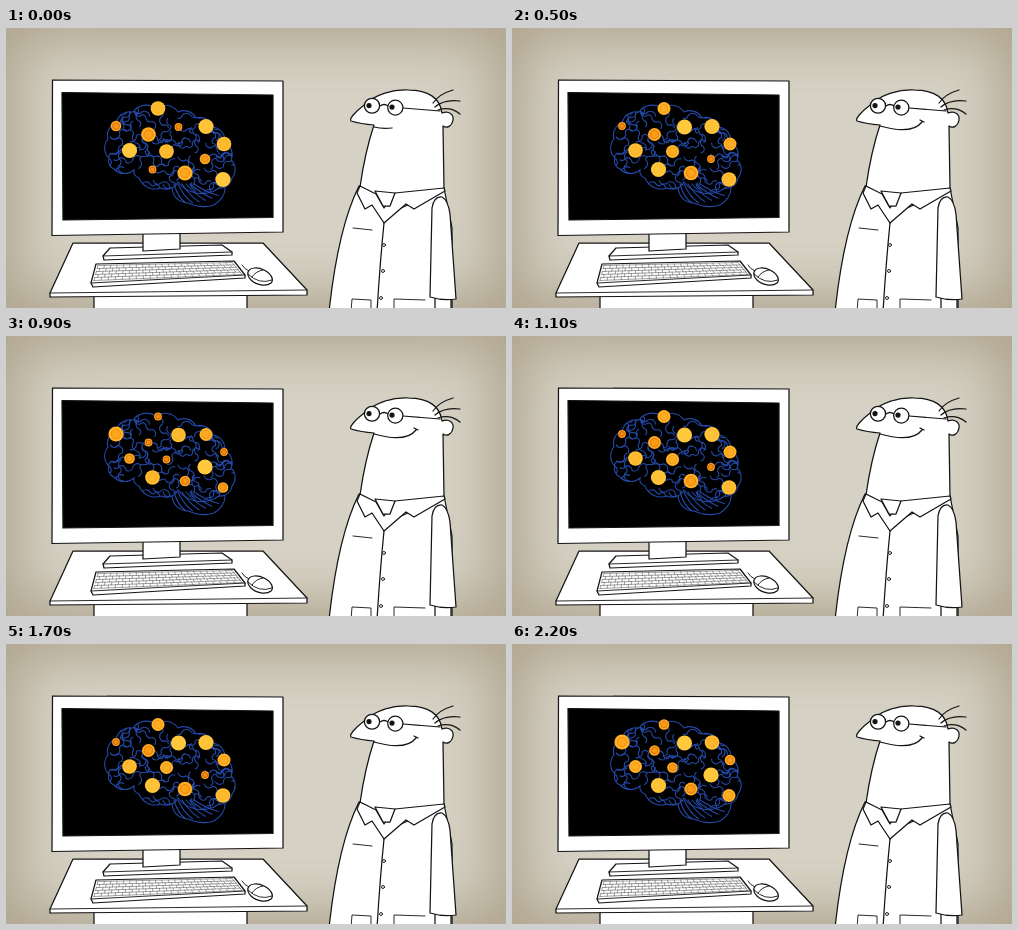
An HTML page for the animation above (2.3 s loop, 500 px wide and 280 px high).

```html
<!DOCTYPE html>
<html lang="en">
<head>
<meta charset="utf-8">
<title>Scientist and brain scan</title>
<style>
html, body { margin: 0; width: 100%; height: 100%; overflow: hidden; }
#stage { width: 500px; height: 280px; overflow: hidden;
  background: #d5d1c4; box-shadow: inset 0 0 56px 12px #aea38c; }
svg { display: block; }
.ink { fill: #fff; stroke: #141414; stroke-width: 1.25; stroke-linejoin: round; stroke-linecap: round; }
.line { fill: none; }
.thin { stroke-width: .9; }
#keys { fill: none; stroke: #444; stroke-width: .5; }
#brain { fill: none; stroke: #2348a6; stroke-width: 1.1; stroke-linecap: round; }
</style>
</head>
<body>
<div id="stage">
<svg width="500" height="280" viewBox="0 0 500 280">
  <clipPath id="inside"><path id="mask"/></clipPath>

  <!-- desk -->
  <g class="ink">
    <path d="M88 267V284H241V264Z"/>
    <path d="M67 215H257L301 262V267L44 269V265Z"/>
    <path class="line thin" d="M44 265L301 262"/>
  </g>

  <!-- monitor -->
  <g class="ink">
    <path d="M104 220L216 217 226 224V227L98 232 97 228Z"/>
    <path class="line thin" d="M97 228L226 224"/>
    <path d="M137 205V223L174 221V204Z"/>
    <path d="M46.5 52L277 53V204L46 207.5Z"/>
    <path fill="#000" d="M56 64.5L267 67V189.5L57 192Z"/>
  </g>

  <g id="brain">
    <path id="outline"/>
    <path id="folds" clip-path="url(#inside)"/>
    <path id="cerebellum"/>
  </g>
  <g id="dots"></g>

  <!-- keyboard and mouse -->
  <g class="ink">
    <path d="M90 236L228 233 239 247V250L87 259 85 255Z"/>
    <path class="line thin" d="M85 255L239 247"/>
    <path id="keys"/>
    <path class="line thin" d="M243 243Q238 241 236 237"/>
    <path d="M242 244C244 239 252 239 258 242C266 246 268 252 265 255C260 259 250 257 245 252Q241 248 242 244Z"/>
    <path class="line thin" d="M242 246Q253 257 266 252M246 249Q250 243 257 242"/>
  </g>

  <!-- scientist -->
  <g class="ink">
    <path d="M353 158Q332 200 323 284H446V200L438 160Z"/>
    <path d="M429 268V284H445V268Z"/>
    <path d="M426 180Q428 168 436 169Q442 172 444 186L450 271Q437 273 424 269Z"/>
    <path d="M345 93C343 91 349 84 357 78C369 66 388 61 403 62C422 62 434 70 436 85C443 82 448 87 447 92C446 98 441 101 437 98L438 161 377 188 354 159Q359 124 368 97Q355 96 345 93Z"/>
    <path class="line" d="M427 75Q433 66 447 62M429 79Q438 71 454 73M432 82Q444 78 454 86"/>
    <path d="M354 158L370 166 378 180 389 165 438 160 439 163 408 181 400 176 378 195 366 177 359 181 351 165Z"/>
    <path d="M369 163L389 165 384 178H377Z"/>
    <path class="line" d="M378 195Q374 235 371 284"/>
    <path class="line thin" d="M347 200L366 202M345 284L346 271 365 272V284M388 284V271L419 272"/>
    <g class="thin"><circle cx="378" cy="217" r="1.5"/><circle cx="377" cy="243" r="1.5"/><circle cx="375" cy="270" r="1.5"/></g>
    <path id="mouth" class="line"/>
    <path class="line" d="M374 78Q378 75 382 78M397 80L434 83"/>
    <g id="eyes"></g>
  </g>
</svg>
</div>
<script>
const LOOP = 2300, STEP = 100, PULSE = 6;
const $ = id => document.getElementById(id);

function set(el, attrs) {
  for (const name in attrs) el.setAttribute(name, attrs[name]);
}

function add(parent, tag, attrs = {}) {
  const el = document.createElementNS('http://www.w3.org/2000/svg', tag);
  set(el, attrs);
  return $(parent).appendChild(el);
}

let seed = 11;
const random = () => (seed = seed * 16807 % 2147483647) / 2147483647;

// The rim is a chain of bulging arcs; the folds are random winding arcs.
function drawBrain() {
  const rim = [[103, 130], [102, 111], [110, 95], [127, 84], [150, 80], [172, 84], [190, 90], [207, 99],
    [219, 115], [225, 132], [226, 150], [213, 160], [172, 154], [155, 160], [133, 150], [128, 142], [108, 141]];
  const d = rim.map(([x, y], i) => {
    const [px, py] = rim.at(i - 1);
    const r = Math.hypot(x - px, y - py) * .72;
    return `A${r} ${r} 0 0 1 ${x} ${y}`;
  }).join('');
  const closed = `M${rim.at(-1)}${d}Z`;
  set($('outline'), { d: closed });
  set($('mask'), { d: closed });

  let folds = '';
  for (let y = 84; y < 162; y += 13)
    for (let x = 104; x < 228; x += 13) {
      let angle = random() * 7;
      folds += `M${x + random() * 7} ${y + random() * 7}`;
      for (let i = 0; i < 4; i++) {
        const size = 5 + random() * 4;
        folds += `a${size * .6} ${size * .6} 0 0 ${i % 2} ${size * Math.cos(angle)} ${size * Math.sin(angle)}`;
        angle += random() * 2.4 - 1.2;
      }
    }
  set($('folds'), { d: folds });

  let lobe = 'M166 160Q168 174 182 175Q196 181 208 177Q219 170 219 160';
  for (let i = 0; i < 6; i++)
    lobe += `M${168 + i * 4} 156Q${172 + i * 6} ${170 - i} ${180 + i * 6.5} ${175 - i * i * .3}`;
  set($('cerebellum'), { d: lobe });
}

function drawKeys() {
  const at = (u, v) => `${92 + 134 * u - 4 * v + 14 * u * v} ${237.5 - 3 * u + 15 * v - 3 * u * v}`;
  let d = '';
  for (let row = 0; row <= 5; row++) {
    d += `M${at(0, row / 5)}L${at(1, row / 5)}`;
    if (row === 5) break;
    for (let col = 0; col <= 21; col++) {
      const u = Math.min(1, (col + row % 2 * .4) / 21);
      d += `M${at(u, row / 5)}L${at(u, (row + 1) / 5)}`;
    }
  }
  set($('keys'), { d });
}

// x, y, step at which the dot is smallest, how yellow it gets
const dots = [
  [110, 98, 5, .4], [152, 80.5, 3, 1], [142.5, 106.5, 3, .4], [172.5, 99, 0, 1],
  [200, 98.5, 1, .9], [218, 116, 3, 1], [123.5, 122.5, 2, 1], [160.5, 123.5, 3, 1],
  [199, 131, 5, 1], [146.5, 141.5, 0, .9], [179, 145, 2, .4], [217, 151.5, 2, 1]
].map(([cx, cy, start, glow]) => ({
  start, glow,
  disc: add('dots', 'circle', { cx, cy }),
  core: add('dots', 'circle', { cx, cy })
}));

const eyes = [0, 1].map(side => ({
  side,
  white: add('eyes', 'ellipse', { cx: 366 + side * 23.3 }),
  pupil: add('eyes', 'circle', { cx: 363 + side * 23, r: 2, fill: '#111' })
}));

// Colours run from brownish orange to plain yellow as a dot ripens.
const amber = (ripe, dark) => `hsl(${43 - (1 - ripe) * (8 + dark * .5)} ${100 - dark * (1 - ripe)}% ${62 - (1 - ripe) * (7 + dark)}%)`;

function drawDot({ start, glow, disc, core }, step) {
  const age = (step - start + PULSE) % PULSE;
  const r = 3.9 + 3.7 * Math.sin(Math.min(1, age / 4) * Math.PI / 2);
  const ripe = Math.min(1, age / 4) * glow;
  set(disc, { r, fill: amber(ripe, 0) });
  set(core, { r: r * .62, fill: amber(ripe, 4), stroke: amber(ripe, 13), 'stroke-width': 1 });
}

let begin;
function draw(now) {
  begin ??= now;
  const t = Math.floor((now - begin) % LOOP / STEP) * STEP;
  dots.forEach(dot => drawDot(dot, t / STEP % PULSE));

  const wide = t >= 600 && t < 900;
  for (const { side, white, pupil } of eyes) {
    set(white, { cy: 77.8 + side * 1.8, rx: 7.6, ry: wide ? 10.6 : 7.4 });
    set(pupil, { cy: 77.5 + side * 1.5 });
  }
  set($('mouth'), { d: t >= 500 ? 'M368 98Q400 107 410 94M408 92L412 94' : 'M368 99Q376 101 386 100' });
  requestAnimationFrame(draw);
}

drawBrain();
drawKeys();
requestAnimationFrame(draw);
</script>
</body>
</html>
```
